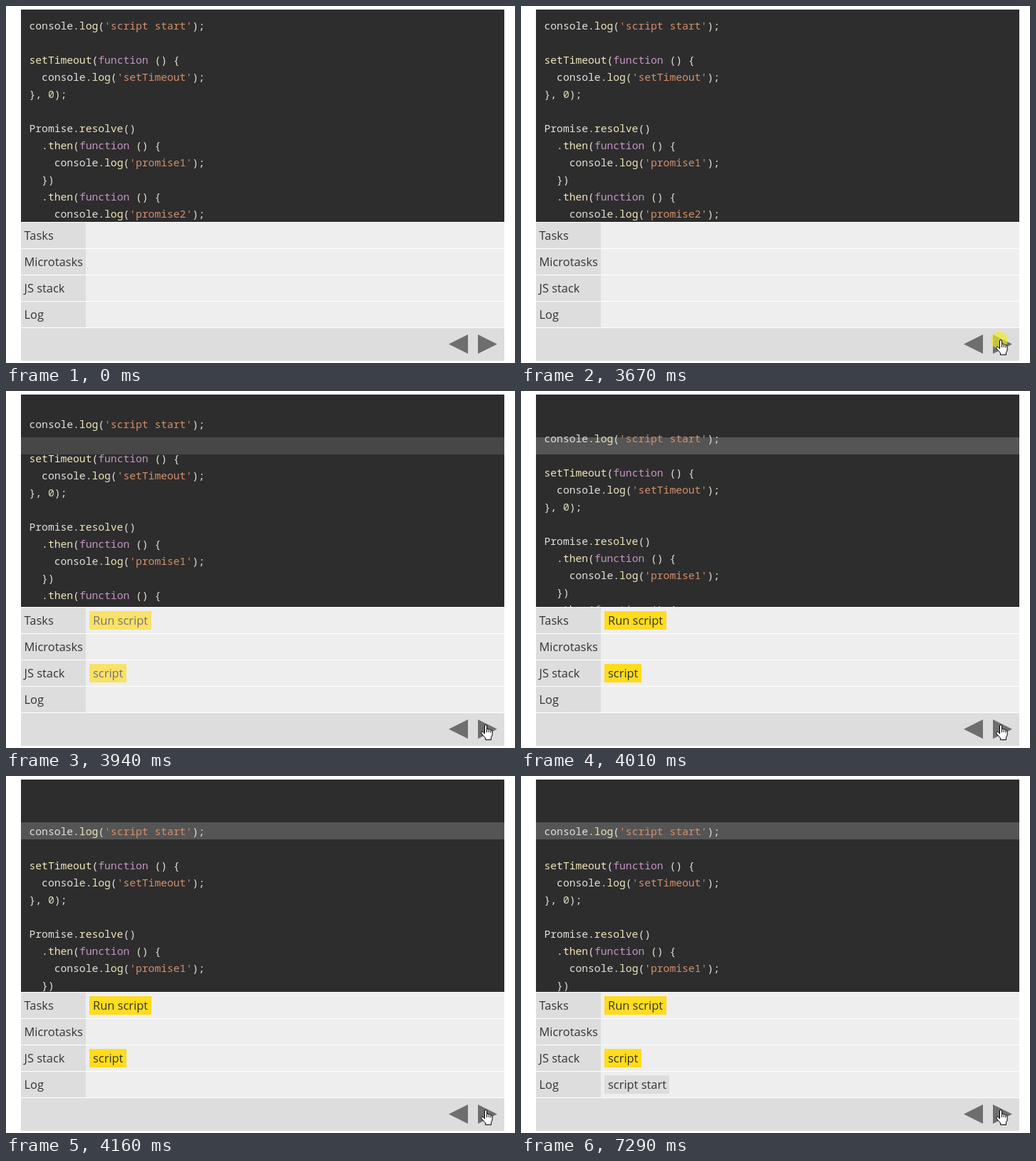
These frames come from a looping animation (714x501 px, 8 s). An HTML page:

```html
<!DOCTYPE html>
<html lang="en">
<head>
<meta charset="utf-8">
<title>Event loop steps</title>
<style>
  html, body { margin: 0; width: 100%; height: 100%; overflow: hidden; background: #fff; }
  svg { display: block; width: 714px; height: 501px; }
  .code text { font: 14.667px "Noto Sans Mono", "DejaVu Sans Mono", monospace; white-space: pre; fill: #e4e1da; }
  .code .fn { fill: #f0e6b8; }
  .code .kw { fill: #c594c5; }
  .code .str { fill: #d38f6c; }
  .code .num { fill: #dcdcb8; }
  .ui text { font: 16.45px "Open Sans", "Noto Sans", sans-serif; fill: #333; }
</style>
</head>
<body>
<svg viewBox="0 0 714 501">
  <defs><clipPath id="pane"><rect x="21" y="5" width="678" height="298"/></clipPath></defs>
  <rect x="21" y="5" width="678" height="298" fill="#2d2d2d"/>
  <rect id="bar" x="21" y="65" width="678" height="24" fill="#555" opacity="0"/>
  <g class="code" clip-path="url(#pane)"><g id="code"></g></g>
  <g class="ui" id="ui"></g>
  <rect x="21" y="452" width="678" height="46" fill="#ddd"/>
  <path d="M621 474.5L648 461V488ZM689 474.5L662 461V488Z" fill="#6e6e6e"/>
  <circle id="click" cx="671" cy="469" r="12" fill="#eeea28" fill-opacity=".68" opacity="0"/>
  <path id="hand" fill="#fff" stroke="#000" stroke-linejoin="round" opacity="0"
    d="M5.5 13V2Q5.5 .5 7 .5T8.5 2V6.5Q10 5.3 11.2 7Q12.8 6 13.8 8Q16.2 7.5 16.2 10V14Q16.2 16 14.5 18V21.5H6.5V19L1.2 13Q.2 11 1.5 10.3Q3 9.8 4.2 11.6ZM8.5 6.5V11M11.2 7.5V11M13.8 8.5V11.5"/>
</svg>
<script>
const LOOP = 8000, FRAME = 70;
const ENTER = 530, RUN = 3870, LOG = 7080;
const $ = id => document.getElementById(id);

function add(parent, tag, attrs, text) {
  const el = document.createElementNS("http://www.w3.org/2000/svg", tag);
  for (const key in attrs) el.setAttribute(key, attrs[key]);
  if (text !== undefined) el.textContent = text;
  return parent.appendChild(el);
}

const source = `console.log('script start');

setTimeout(function () {
  console.log('setTimeout');
}, 0);

Promise.resolve()
  .then(function () {
    console.log('promise1');
  })
  .then(function () {
    console.log('promise2');`;

const token = /(?<str>'[^']*')|(?<kw>\bfunction\b)|(?<fn>\w+(?=\())|(?<num>\b\d+\b)|(?<plain>[^'\w]+|\w+)/g;

source.split("\n").forEach((line, i) => {
  const row = add($("code"), "text", { x: 32.5, y: 33 + 24 * i });
  for (const { 0: text, groups } of line.matchAll(token)) {
    const kind = Object.keys(groups).find(name => groups[name]);
    add(row, "tspan", { class: kind }, text);
  }
});

const rowTop = i => 304 + 37 * i;

function chip(row, width, fill, label) {
  const y = rowTop(row) + 5;
  const g = add($("ui"), "g", { opacity: 0 });
  add(g, "rect", { x: 117, y, width, height: 26, fill });
  add(g, "text", { x: 122, y: y + 19 }, label);
  return g;
}

["Tasks", "Microtasks", "JS stack", "Log"].forEach((label, i) => {
  const y = rowTop(i);
  add($("ui"), "rect", { x: 21, y, width: 91, height: 36, fill: "#ddd" });
  add($("ui"), "rect", { x: 112, y, width: 587, height: 36, fill: "#eee" });
  add($("ui"), "text", { x: 25.5, y: y + 24 }, label);
});

const tasks = chip(0, 87, "#ffdc1e", "Run script");
const stack = chip(2, 52, "#ffdc1e", "script");
const log = chip(3, 91, "#ddd", "script start");

const clamp = x => Math.min(1, Math.max(0, x));
const smooth = x => x * x * (3 - 2 * x);
const easeOut = x => 1 - (1 - x) ** 2;
const lerp = (a, b, p) => a + (b - a) * p;

// Progress in whole frames; a change is already under way in its first frame.
function progress(t, start, first, step) {
  return t < start ? 0 : clamp(first + step * Math.floor((t - start) / FRAME));
}

const fade = (t, start) => smooth(progress(t, start, .2, .4));
const pressed = (t, from, to) => t >= from && t < to;
const show = (el, value) => el.setAttribute("opacity", Number(value));
const move = (el, x, y) => el.setAttribute("transform", `translate(${x} ${y})`);

function draw(now) {
  const t = now % LOOP;
  move($("code"), 0, 50 * smooth(progress(t, RUN, .15, .27)));
  for (const el of [$("bar"), tasks, stack]) show(el, fade(t, RUN));
  show(log, fade(t, LOG));
  show($("click"), pressed(t, RUN - 200, RUN) || pressed(t, LOG - 130, LOG));

  const p = easeOut(progress(t, ENTER, 0, .25));
  show($("hand"), t >= ENTER);
  move($("hand"), lerp(679, 666, p), lerp(489, 468, p));
}

let start;
function tick(now) {
  start ??= now;
  draw(now - start);
  requestAnimationFrame(tick);
}
draw(0);
requestAnimationFrame(tick);
</script>
</body>
</html>
```
